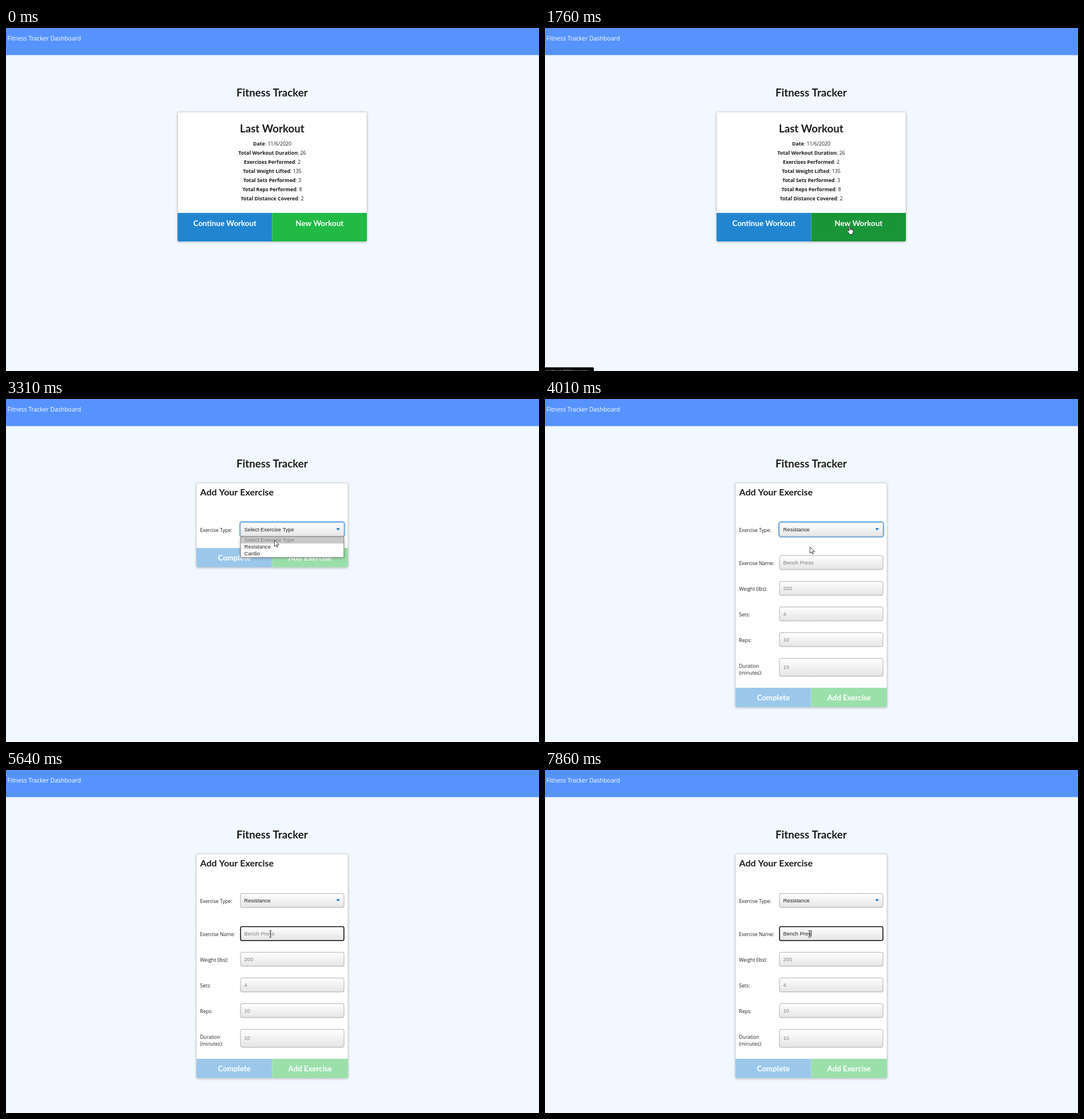
Write an HTML page with a canvas that moves like this. It is 932 by 601 pixels and loops after 8 s.

```html
<!DOCTYPE html>
<html lang="en">
<head>
<meta charset="utf-8">
<title>Fitness Tracker</title>
<style>
html, body { margin: 0; width: 100%; height: 100%; overflow: hidden; background: #f2f8ff; }
canvas { display: block; width: 932px; height: 601px; }
</style>
</head>
<body>
<canvas id="stage" width="932" height="601"></canvas>
<script>
const ctx = document.getElementById("stage").getContext("2d");
const LOOP = 8000;
const UNIT = 2 / 3; // page zoom
const LATO = "Lato, sans-serif";
const UI = "'Open Sans', 'Noto Sans', sans-serif";
const ARIAL = "'Liberation Sans', Arial, sans-serif";

const T = {
  status: 1440, press: 1670, page: 1990, ring: 2840, popup: 2920, hover: 3390,
  chosen: 3940, form: 4010, focus: 5110, caretOff: 5640
};
const NAME = "Bench Press";
const KEYS = [5960, 6130, 6350, 6830, 6980, 7150, 7370, 7540, 7610, 7860];

// Pointer moves: start, end, number of redraws, goal x, goal y
const START = [931, 636];
const MOVES = [
  [210, 520, 5, 771, 413],
  [750, 1140, 6, 512, 336],
  [1210, 1290, 2, 532, 347],
  [2050, 2050, 1, 537, 351],
  [2290, 2440, 3, 478, 228],
  [2520, 2520, 1, 472, 223],
  [3160, 3310, 3, 469, 247],
  [3390, 3460, 2, 463, 259],
  [4240, 4390, 3, 459, 259],
  [4560, 4640, 2, 458, 249],
  [4720, 4790, 2, 458, 267],
  [4960, 4960, 1, 462, 287]
];

const STATS = [
  ["Date", "11/6/2020"], ["Total Workout Duration", "26"], ["Exercises Performed", "2"],
  ["Total Weight Lifted", "135"], ["Total Sets Performed", "3"],
  ["Total Reps Performed", "8"], ["Total Distance Covered", "2"]
];
const FIELDS = [
  ["Weight (lbs):", "200", 319], ["Sets:", "4", 364], ["Reps:", "10", 409]
];

function text(str, x, y, font, color, align = "left") {
  ctx.font = font;
  ctx.fillStyle = color;
  ctx.textAlign = align;
  ctx.fillText(str, x, y);
}

function rect(x, y, w, h, color) {
  ctx.fillStyle = color;
  ctx.fillRect(x, y, w, h);
}

function roundBox(x, y, w, h, radii) {
  ctx.beginPath();
  ctx.roundRect(x, y, w, h, radii);
}

function withShadow(color, blur, dy, draw) {
  ctx.save();
  ctx.shadowColor = color;
  ctx.shadowBlur = blur;
  ctx.shadowOffsetY = dy;
  draw();
  ctx.restore();
}

function stroke(color, width) {
  ctx.strokeStyle = color;
  ctx.lineWidth = width;
  ctx.stroke();
}

function mix(a, b, k) {
  return `rgb(${a.map((v, i) => Math.round(v + (b[i] - v) * k))})`;
}

function card(x, right, bottom) {
  roundBox(x, 147, right - x, bottom - 147, 2.7);
  ctx.fillStyle = "#fff";
  withShadow("#b0b2b4", 4, 1, () => ctx.fill());
  stroke("#d4d4d5", 1);
}

function buttons(x, right, y, bottom, labels, colors, baseline) {
  const mid = (x + right) / 2;
  const sides = [[x, [0, 0, 0, 2.7]], [mid, [0, 0, 2.7, 0]]];
  sides.forEach(([left, radii], i) => {
    roundBox(left, y, mid - x, bottom - y, radii);
    ctx.fillStyle = colors[i];
    ctx.fill();
    text(labels[i], left + (mid - x) / 2, baseline, `bold ${20 * UNIT}px ${LATO}`, "#fff", "center");
  });
}

function header() {
  rect(0, 0, 932, 601, "#f2f8ff");
  rect(0, 0, 932, 47.5, "#5693ff");
  text("Fitness Tracker Dashboard", 2.6, 22.3, `10.45px ${UI}`, "#fff");
  text("Fitness Tracker", 465.3, 119.6, `bold ${28 * UNIT}px ${LATO}`, "#1b1c1d", "center");
}

function stat([name, value], i) {
  const y = 206.3 + 15.9 * i;
  const bold = `bold 8.8px ${UI}`, plain = `8.8px ${UI}`;
  const tail = ": " + value;
  ctx.font = bold;
  const nameWidth = ctx.measureText(name).width;
  ctx.font = plain;
  const x = 465.5 - (nameWidth + ctx.measureText(tail).width) / 2;
  text(name, x, y, bold, "#1b1c1d");
  text(tail, x + nameWidth, y, plain, "#1b1c1d");
}

function homePage(t) {
  card(300, 631, 374);
  text("Last Workout", 465.3, 182.5, `bold ${28 * UNIT}px ${LATO}`, "#1b1c1d", "center");
  STATS.forEach(stat);
  const k = Math.max(0, Math.min(1, (t - T.press + 40) / 100));
  const green = t < T.press ? "#21ba45" : mix([33, 186, 69], [25, 149, 55], k);
  buttons(300, 631, 324, 374, ["Continue Workout", "New Workout"], ["#2185d0", green], 346.8);
  if (t >= T.status) statusBar(t < T.status + 80 ? 0.6 : 1);
}

function statusBar(alpha) {
  ctx.globalAlpha = alpha;
  roundBox(-4, 594.5, 89.5, 12, 2);
  ctx.fillStyle = "#0a0a0a";
  ctx.fill();
  text("localhost:3000/exercise", -1.5, 603.8, `7.2px ${UI}`, "#e8e8e8");
  ctx.globalAlpha = 1;
}

function control(y, h = 25) {
  const fill = ctx.createLinearGradient(0, y, 0, y + h);
  fill.addColorStop(0, "#fff");
  fill.addColorStop(1, "#e5e5e5");
  roundBox(410, y + 0.4, 181, h - 0.6, 3);
  ctx.fillStyle = fill;
  withShadow("rgba(0,0,0,.08)", 1, 0.7, () => ctx.fill());
  stroke("#aaa", 0.9);
}

const arial = (str, x, y, color) => text(str, x, y, `${14 * UNIT}px ${ARIAL}`, color);
const label = (str, y) => text(str, 339.3, y, `8.65px ${UI}`, "#222");

function selectBox(value, ring) {
  label("Exercise Type:", 232.5);
  if (ring) {
    roundBox(409, 215.2, 183, 26.4, 4);
    stroke("rgba(59,153,252,.7)", 2.4);
  }
  control(216);
  arial(value, 416.6, 231.8, "#222");
  ctx.beginPath();
  ctx.moveTo(577.3, 226.4);
  ctx.lineTo(584.1, 226.4);
  ctx.lineTo(580.7, 230.2);
  ctx.fillStyle = "#0a72b8";
  ctx.fill();
}

function popup(hover) {
  ctx.fillStyle = "#fff";
  withShadow("rgba(0,0,0,.35)", 5, 1.5, () => ctx.fillRect(410, 241, 181, 36.7));
  if (hover) rect(410, 253, 181, 12, "#1967d2");
  else rect(410, 241, 181, 12.2, "#c8c8c8");
  ctx.beginPath();
  ctx.rect(410.3, 241.2, 180.4, 36.2);
  stroke("#767676", 0.8);
  arial("Select Exercise Type", 416.8, 250.2, "#808080");
  arial("Resistance", 416.8, 262.2, hover ? "#fff" : "#222");
  arial("Cardio", 416.8, 274.2, "#222");
}

function nameField(t) {
  const typed = NAME.slice(0, KEYS.filter(k => t >= k).length);
  const focused = t >= T.focus;
  label("Exercise Name:", 290.5);
  control(274);
  if (focused) {
    roundBox(410.2, 274.5, 180.6, 24.2, 2.2);
    stroke("#101010", 1.5);
  }
  arial(typed || NAME, 416.6, 290, typed ? "#222" : "#808080");
  if (focused && (t < T.caretOff || typed)) {
    const x = 416.6 + ctx.measureText(typed).width;
    rect(Math.round(x), 281, 1, 11, "#222");
  }
}

function detailForm(t) {
  nameField(t);
  for (const [name, hint, y] of FIELDS) {
    label(name, y + 16.5);
    control(y);
    arial(hint, 416.6, y + 16, "#808080");
  }
  label("Duration", 470.6);
  label("(minutes):", 483.2);
  control(454, 32);
  arial("10", 416.6, 473.4, "#808080");
}

function exercisePage(t) {
  const open = t >= T.form;
  const top = open ? 506 : 261;
  card(333, 598, top + 33.7);
  text("Add Your Exercise", 339.6, 169.3, `bold ${24 * UNIT}px ${LATO}`, "#1b1c1d");
  buttons(333, 598, top, top + 33.7, ["Complete", "Add Exercise"], ["#9bc8ea", "#9be0ab"], top + 22.2);
  selectBox(t >= T.chosen ? "Resistance" : "Select Exercise Type", t >= T.ring && t < T.focus);
  if (open) detailForm(t);
  else if (t >= T.popup && t < T.chosen) popup(t >= T.hover);
}

function pointerAt(t) {
  let [x, y] = START;
  for (const [t0, t1, steps, gx, gy] of MOVES) {
    if (t < t0) break;
    const done = t1 > t0 ? Math.floor((t - t0) / (t1 - t0) * (steps - 1) + 1e-6) + 1 : steps;
    const k = Math.min(1, done / steps);
    x += (gx - x) * k;
    y += (gy - y) * k;
  }
  return [x, y];
}

const ARROW = new Path2D("M0 0V16.5L4 13L6.5 18.6L9 17.5L6.5 12H11.8Z");
const HAND = new Path2D("M-1.5 1.5Q0 -.5 1.5 1.5V6.5L4.5 7L7.5 8Q10 8.5 10 11V15L8 18.5V21.5H-.5L-1 19L-6 12.5Q-6.5 10 -4 10.5L-1.5 13Z");
const KNUCKLES = new Path2D("M1.5 6.5V11M4.5 7.5V11M7.5 8.5V11.5");
const BEAM = new Path2D("M-3.5 -8.5H-1Q0 -8.5 0 -7.5Q0 -8.5 1 -8.5H3.5M0 -7.5V7.5M-3.5 8.5H-1Q0 8.5 0 7.5Q0 8.5 1 8.5H3.5");

function pointer(t) {
  if (t < MOVES[0][0]) return;
  const [x, y] = pointerAt(t);
  const onButton = t < T.page && x > 466 && x < 631 && y > 324 && y < 374;
  const onField = t >= T.form && y > 274 && y < 299;
  ctx.save();
  ctx.translate(x + 0.4, y + 0.3);
  ctx.scale(UNIT, UNIT);
  ctx.strokeStyle = "#111";
  ctx.fillStyle = "#fff";
  ctx.lineWidth = 1.2;
  if (onField) {
    ctx.stroke(BEAM);
  } else {
    const shape = onButton ? HAND : ARROW;
    ctx.fill(shape);
    ctx.stroke(shape);
    if (onButton) ctx.stroke(KNUCKLES);
  }
  ctx.restore();
}

function frame() {
  const t = performance.now() % LOOP;
  header();
  if (t < T.page) homePage(t);
  else exercisePage(t);
  pointer(t);
  requestAnimationFrame(frame);
}
frame();
</script>
</body>
</html>
```
